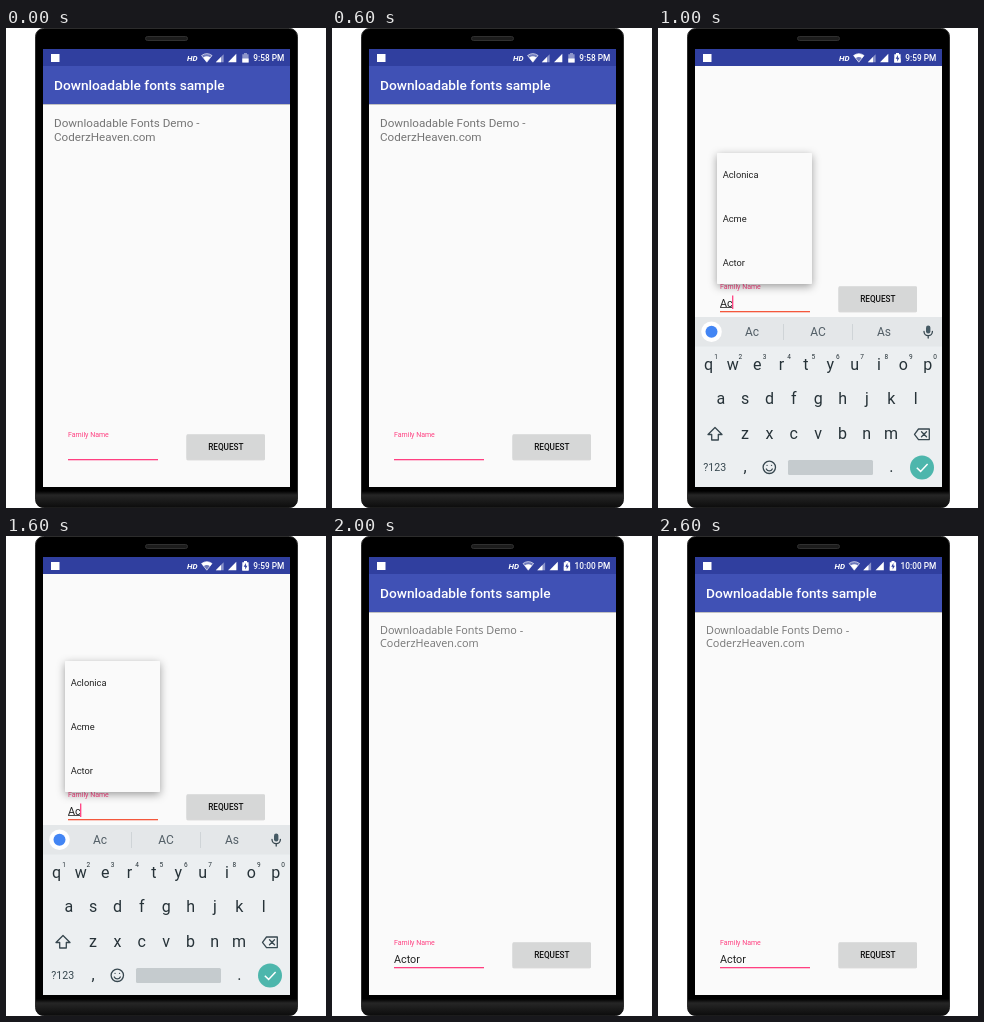
Recreate the animation shown at these times as an HTML page. Size 320 by 480 pixels, loop 3 s.

```html
<!DOCTYPE html>
<html lang="en">
<head>
<meta charset="utf-8">
<title>Downloadable fonts demo</title>
<style>
html, body { margin: 0; width: 100%; height: 100%; overflow: hidden; background: #fff; }
svg { display: block; width: 320px; height: 480px; font-family: Roboto, sans-serif; }
.mid { text-anchor: middle; }
.med { font-weight: 500; }
.key { font-size: 16px; fill: #263238; text-anchor: middle; }
.line { fill: none; stroke: #37474f; stroke-width: 1.3; stroke-linejoin: round; stroke-linecap: round; }
</style>
</head>
<body>
<svg viewBox="0 0 320 480">
  <defs>
    <filter id="low" x="-10%" y="-20%" width="120%" height="160%">
      <feDropShadow dx="0" dy="0.8" stdDeviation="0.7" flood-opacity=".28"/>
    </filter>
    <filter id="high" x="-25%" y="-25%" width="150%" height="150%">
      <feDropShadow dx="0" dy="2.5" stdDeviation="4" flood-opacity=".38"/>
    </filter>
    <linearGradient id="chin" x2="0" y2="1">
      <stop offset="0" stop-color="#000"/>
      <stop offset=".25" stop-color="#262626"/>
      <stop offset="1" stop-color="#0c0c0c"/>
    </linearGradient>
    <clipPath id="screen"><rect x="37" y="21" width="247" height="438"/></clipPath>
  </defs>

  <rect x="29.5" y=".5" width="262" height="479" rx="8" stroke="#2c2c2c"/>
  <path d="M30 463H291V472Q291 479.5 283.5 479.5H37.5Q30 479.5 30 472Z" fill="url(#chin)"/>
  <rect x="139.5" y="8.5" width="42" height="4" rx="2" fill="#1c1c1c" stroke="#303030"/>

  <g clip-path="url(#screen)">
    <rect x="37" y="21" width="248" height="438" fill="#fafafa"/>

    <g id="home">
      <rect x="37" y="37" width="248" height="39" fill="#3f51b5" filter="url(#low)"/>
      <text class="med" x="48" y="62" font-size="13.7" fill="#fff">Downloadable fonts sample</text>
      <g id="demo" fill="#757575">
        <text x="48" y="99">Downloadable Fonts Demo -</text>
        <text x="48" y="112.7">CoderzHeaven.com</text>
      </g>
    </g>

    <g id="form">
      <text x="62" y="409" font-size="7" fill="#ff4081">Family Name</text>
      <text id="value" x="62" y="426.5" font-size="10.8" fill="#212121"></text>
      <rect id="rule" x="62" y="431" width="90" height="1.3"/>
      <rect x="180.5" y="406.3" width="78.5" height="25" rx="1.4" fill="#d6d7d7" filter="url(#low)"/>
      <text class="med mid" x="219.8" y="421.8" font-size="8.2" fill="#111">REQUEST</text>
    </g>

    <g id="typing">
      <path d="M62 279.5H74" stroke="#212121" stroke-width=".8"/>
      <path d="M74.7 267.5V281" stroke="#ff4081" stroke-width="1.3"/>
      <rect x="59" y="125" width="95" height="131" rx="1" fill="#fafafa" filter="url(#high)"/>
      <g id="list" font-size="9.3" fill="#212121"></g>
      <rect x="37" y="289" width="248" height="30" fill="#e4e7e9"/>
      <rect x="37" y="318.5" width="248" height="141" fill="#eceff1"/>
      <circle cx="53.5" cy="303.8" r="10.3" fill="#fff"/>
      <circle cx="53.5" cy="303.8" r="6" fill="#4285f4"/>
      <path d="M125.5 296V312M194.5 296V312" stroke="#cfd4d7"/>
      <g id="hints" class="mid" font-size="12" fill="#546068"></g>
      <rect x="268" y="297.5" width="4.4" height="8" rx="2.2" fill="#455a64"/>
      <path class="line" d="M266 303.5a4.2 4.2 0 0 0 8.4 0M270.2 307.8V310"/>
      <g id="keys"></g>
      <path class="line" d="M57 399.5L64 406.5H60.3V412H53.7V406.5H50Z"/>
      <path class="line" d="M256.5 406.3L260.5 401H271.3V411.6H260.5ZM263.5 403.8L268.5 408.8M268.5 403.8L263.5 408.8"/>
      <text class="mid" x="56.7" y="443" font-size="10.6" fill="#37474f">?123</text>
      <circle class="line" cx="111.3" cy="439.3" r="6.2"/>
      <path class="line" d="M108.3 441a3.3 3.3 0 0 0 6 0M109 437.3h.1M113.5 437.3h.1"/>
      <rect x="130" y="432" width="85" height="15" rx="1.5" fill="#c5cbce"/>
      <circle cx="264" cy="439.5" r="12" fill="#4db6ac"/>
      <path d="M258.8 439.8L262.6 443.4L269.6 436" fill="none" stroke="#fff" stroke-width="1.5"/>
    </g>

    <rect x="37" y="21" width="248" height="17" fill="#303f9f"/>
    <rect x="45" y="26" width="8.5" height="8" fill="#fff"/>
    <g id="icons" fill="#fff">
      <text x="181" y="32.8" font-size="8" font-weight="700" font-style="italic">HD</text>
      <path d="M195.6 27.5Q200.8 23.8 206 27.5L200.8 34.2Z" fill-opacity=".3" stroke="#fff" stroke-opacity=".75" stroke-width=".9"/>
      <path id="wifi"/>
      <path d="M209.8 34.2H217.6V26.2Z" opacity=".45"/>
      <path d="M209.8 34.2H215V29Z"/>
      <path d="M222 34.2H230.3V25.8Z"/>
      <path id="cell" d="M236.3 26.2H238V25H241V26.2H242.6V34.5H236.3Z"/>
      <path d="M236.3 30.5H242.6V34.5H236.3Z"/>
      <path id="bolt" d="M239.9 27L237.7 30.8H239.2V33.6L241.4 29.8H239.9Z" fill="#303f9f"/>
    </g>
    <text id="clock" class="med" x="278.3" y="32.8" font-size="8.3" fill="#fff" text-anchor="end"></text>
  </g>
</svg>
<script>
const $ = id => document.getElementById(id);

function label(parent, text, x, y, cls, size) {
  const el = document.createElementNS("http://www.w3.org/2000/svg", "text");
  el.setAttribute("x", x);
  el.setAttribute("y", y);
  if (cls) el.setAttribute("class", cls);
  if (size) el.style.fontSize = size + "px";
  el.textContent = text;
  $(parent).append(el);
}

["Aclonica", "Acme", "Actor"].forEach((s, i) => label("list", s, 64.7, 150 + i * 43.8));
["Ac", "AC", "As"].forEach((s, i) => label("hints", s, 94 + i * 66, 308));

const rows = [["qwertyuiop", 50.5, 341.5], ["asdfghjkl", 62.8, 376], ["zxcvbnm", 87, 410.5]];
for (const [row, x, y] of rows)
  [...row].forEach((c, i) => label("keys", c, x + i * 24.35, y, "key"));
[..."1234567890"].forEach((c, i) => label("keys", c, 58 + i * 24.35, 330.5, "key", 6.5));
label("keys", ",", 87, 443.5, "key");
label("keys", ".", 233.3, 443.5, "key");

const weakFan = "M197.2 29.5Q200.8 27 204.4 29.5L200.8 34Z";
const fullFan = "M195.6 27.5Q200.8 23.8 206 27.5L204 30.2Q200.8 28 197.6 30.2Z";
const scenes = [
  { clock: "9:58 PM", value: "", wifi: weakFan, font: "Roboto, sans-serif", size: 11.65, rise: 0 },
  { clock: "9:59 PM", value: "Ac", wifi: fullFan, typing: true, charging: true },
  { clock: "10:00 PM", value: "Actor", wifi: weakFan, charging: true, shift: -4.5,
    font: "'Open Sans', sans-serif", size: 10.85, rise: -1.2 }
];

const show = (id, on) => $(id).style.display = on ? "" : "none";
const move = (id, x, y) => $(id).setAttribute("transform", `translate(${x} ${y})`);

function draw(ms) {
  const s = scenes[Math.floor(ms % 3000 / 1000)];
  show("home", !s.typing);
  show("typing", s.typing);
  show("bolt", s.charging);
  $("cell").setAttribute("opacity", s.charging ? 1 : .45);
  move("form", 0, s.typing ? -148 : 0);
  move("icons", s.shift || 0, 0);
  $("rule").setAttribute("fill", s.typing ? "#f4583c" : "#ff4081");
  $("wifi").setAttribute("d", s.wifi);
  $("value").textContent = s.value;
  $("clock").textContent = s.clock;
  if (s.font) {
    $("demo").style.fontFamily = s.font;
    $("demo").style.fontSize = s.size + "px";
    move("demo", 0, s.rise);
  }
}

let start;
function tick(now) {
  start ??= now;
  draw(Math.max(0, now - start));
  requestAnimationFrame(tick);
}
draw(0);
requestAnimationFrame(tick);
</script>
</body>
</html>
```
